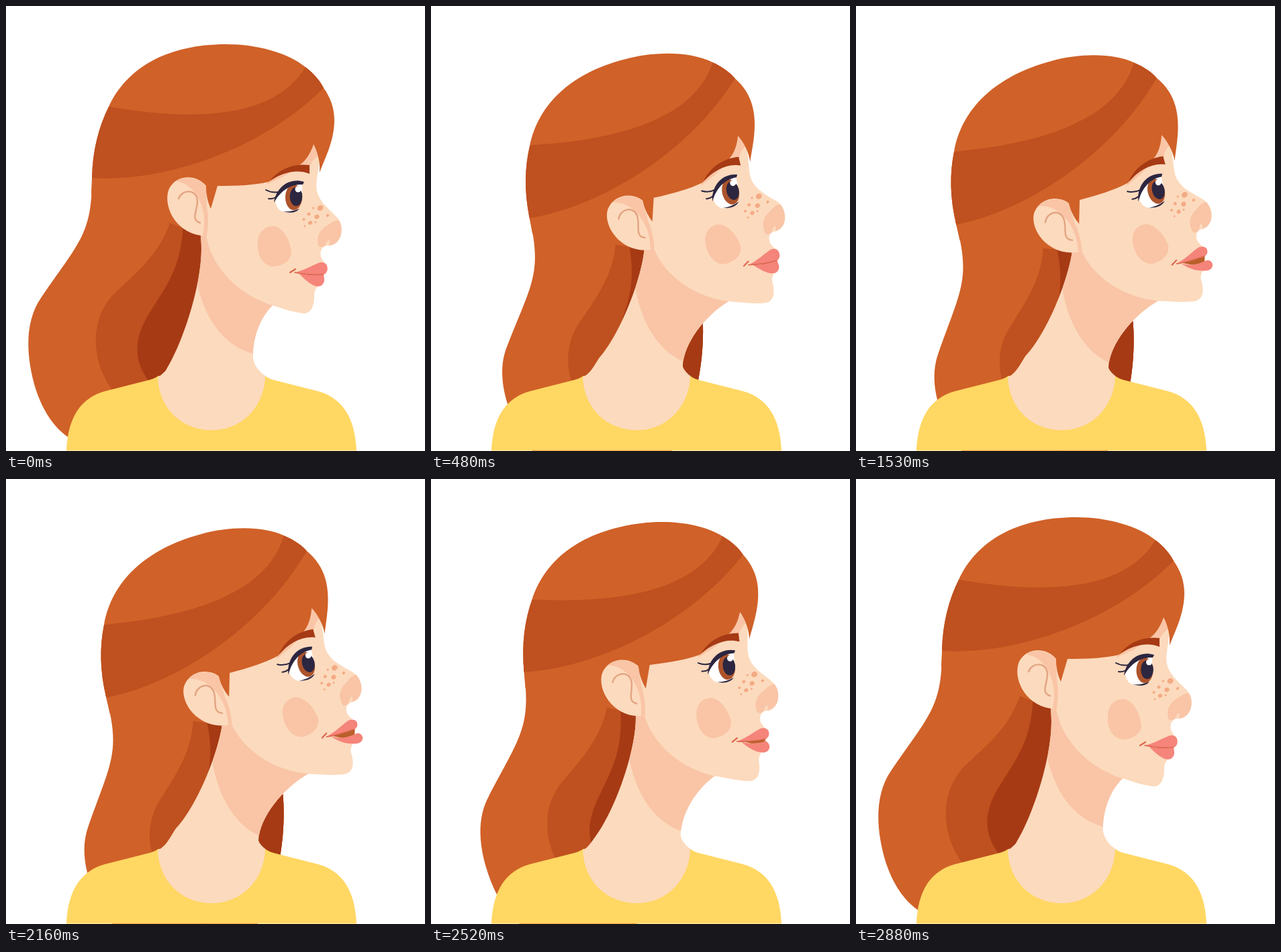
Animation of 624x663 px, one loop 3630 ms. Source, as an HTML page with a canvas:

```html
<!DOCTYPE html>
<html lang="en">
<head>
<meta charset="utf-8">
<title>Profile portrait</title>
<style>
html, body { margin: 0; width: 100%; height: 100%; overflow: hidden; background: #fff; }
canvas { display: block; }
</style>
</head>
<body>
<canvas id="stage" width="624" height="663"></canvas>
<script>
const ctx = document.getElementById('stage').getContext('2d');
const LOOP = 3630, STEP = 30;
const PIVOT = { x: 404, y: 210 }, TILT = -15 * Math.PI / 180;
const C = {
  hair: '#d06128', band: '#bf501f', deep: '#a63a14',
  skin: '#fcdabd', shade: '#f9c5a6', freckle: '#f3ab84', fold: '#e3a483',
  ink: '#2c2640', iris: '#ad532b', lip: '#f5847a', lipLine: '#dc6850',
  mouth: '#b9602a', shirt: '#ffd763'
};

const backHair = new Path2D(`M128 250 C129 340 110 350 52 435 C28 470 29 520 44 570
  C55 604 72 628 92 642 C130 664 200 668 245 652 C285 620 330 545 345 463 L330 300 Z`);
const face = new Path2D(`M460 200 L466 225 C467 245 460 262 463 275 C466 290 478 300 490 312
  C499 320 501 330 499 340 C496 353 486 358 478 357 C470 358 467 366 469 374 L476 386 L473 402
  L466 416 C458 424 459 428 459 436 C458 450 453 458 443 458 C425 456 410 450 397 446
  C344 430 299 383 297 330 L298 262 L350 240 Z`);

// A path string part way (k) between two strings of the same structure.
function mix(a, b, k) {
  const ends = b.match(/[\d.]+/g);
  let i = 0;
  return a.replace(/[\d.]+/g, n => +n + (ends[i++] - n) * k);
}

const toPath = d => d instanceof Path2D ? d : new Path2D(d);

function fill(color, d) {
  ctx.fillStyle = color;
  ctx.fill(toPath(d));
}

function stroke(color, width, d) {
  ctx.strokeStyle = color;
  ctx.lineWidth = width;
  ctx.lineCap = ctx.lineJoin = 'round';
  ctx.stroke(toPath(d));
}

function oval(color, x, y, rx, ry = rx, turn = 0) {
  ctx.fillStyle = color;
  ctx.beginPath();
  ctx.ellipse(x, y, rx, ry, turn, 0, 7);
  ctx.fill();
}

function clipped(d, draw) {
  ctx.save();
  ctx.clip(toPath(d));
  draw();
  ctx.restore();
}

// Everything on the head is rigid and turns together.
function onHead(p, draw) {
  const bow = p * (1 - p);
  ctx.save();
  ctx.translate(PIVOT.x + 12 * bow, PIVOT.y - 6 * bow);
  ctx.rotate(TILT * p);
  ctx.translate(-PIVOT.x, -PIVOT.y);
  draw();
  ctx.restore();
}

function drawBackHair() {
  fill(C.hair, backHair);
  clipped(backHair, () => {
    fill(C.band, 'M250 300 C240 350 218 377 170 420 C120 462 128 530 157 570 L185 620 L345 620 L345 300 Z');
    fill(C.deep, 'M264 320 C262 390 240 415 212 460 C188 500 192 530 212 558 L250 610 L345 610 L345 300 Z');
  });
}

function drawBody(p) {
  fill(C.shirt, `M90 662.6 C92 612 112 584 147 574 L210 558 Q220 556 227 551 L386 551
    Q392 556 402 558 L465 574 C500 584 520 612 522 662.6 Z`);
  const neck = mix(
    `M290 335 L290 345 C297 400 265 500 238 543 C234 547 230 551 226 553 C228 600 262 632 307 632
     C350 632 385 598 386 551 C374 543 369 532 368 525 C367 500 375 468 397 446 L400 400 L310 340 Z`,
    `M328 358 L322 365 C316 410 283 490 252 522 C245 533 238 548 226 553 C228 600 262 632 307 632
     C350 632 385 598 386 551 C381 547 376 541 376 538 C378 505 410 462 452 438 L430 400 L345 350 Z`, p);
  fill(C.skin, neck);
  clipped(neck, () => fill(C.shade, mix(
    'M282 325 L286 420 C300 475 330 508 368 518 L450 500 L450 325 Z',
    'M308 345 L308 425 C318 480 345 517 376 531 L470 510 L470 345 Z', p)));
}

function drawEye(blink, gaze) {
  ctx.save();
  ctx.translate(0, 300);
  ctx.scale(1, 1 - 0.92 * blink);
  ctx.translate(0, -300);
  fill('#fff', 'M401 291 C406 274 422 264 441 264 C442 285 440 298 431 305 C420 309 404 310 401 291 Z');
  oval(C.iris, 428.5 + gaze, 285, 12.5, 19);
  oval(C.ink, 432 + gaze, 284, 9.3, 14);
  oval('#fff', 435 + gaze, 273, 4.5);
  fill(C.ink, 'M399 293 C402 271 421 255 444 262 L442 266 C426 265 410 273 399 293 Z');
  stroke(C.ink, 2, 'M406 277 Q396 279 387 274 M402 285 Q397 288 391 287');
  ctx.restore();
  fill(C.ink, 'M412 306 Q426 307 437 302 Q430 311 412 306 Z');
}

function drawMouth(m) {
  fill(C.mouth, mix(
    'M438 398 L473 397 L470 403 L455 402 Z',
    'M438 398 L474 395 L470 407 L452 405 Z', m));
  fill(C.lip, mix(
    'M436 398 C446 401 458 402 473 400 C474 406 475 410 472 414 C468 420 460 418 454 414 Q446 409 436 398 Z',
    'M436 398 C446 405 460 407 473 404 C480 403 483 410 481 414 C477 422 466 418 458 415 Q446 410 436 398 Z', m));
  fill(C.lip, mix(
    'M430 397 C446 393 455 387 464 383.5 C471 380 477 383 478 387 C480 393 478 398 473 400.5 C458 402 447 400 430 397 Z',
    'M430 397 C446 393 455 387 464 383.5 C471 380 477 383 479 387 C480 393 477 396 473 397 C458 397 447 399 430 397 Z', m));
  stroke(C.lipLine, 1.6, mix('M430 397 C445 400 458 401 472 400', 'M430 397 C441 399 452 398 472 397', m));
  stroke(C.lipLine, 2.2, 'M423 397 L431 392');
}

function drawFace(blink, gaze, mouth) {
  fill(C.skin, face);
  clipped(face, () => {
    fill(C.shade, 'M455 195 L470 222 Q457 226 453 238 L436 240 L412 255 L388 266 L400 225 Z');
    fill(C.shade, `M466 359 C461 346 466 333 480 326 C488 320 492 318 503 320 L503 358 L481 358
      L482 349 C476 350 478 356 472 359 Z`);
    [[457.5, 301, 1.7], [451, 310, 2.6], [463, 314, 3.7], [443.5, 318, 2.1], [453, 323, 3.2],
     [461, 322, 1.6], [445, 328, 1.5], [468, 301, 4.6], [479, 312, 2.3]]
      .forEach(([x, y, r]) => oval(C.freckle, x, y, r, r * 0.88, -0.4));
  });
  fill(C.shade, `M375 351 C376 335 387 327 400 328 C413 331 424 350 425 368
    C423 382 410 388 396 388 C382 386 373 370 375 351 Z`);
  drawMouth(mouth);
  drawEye(blink, gaze);
}

function drawFrontHair() {
  fill(C.hair, `M128 256 C129 215 138 180 153 150 C180 92 240 57 328 57 C375 57 420 70 446 91
    C460 102 468 112 473 122 C483 136 489 152 489 170 C489 200 476 225 467 248
    C468 232 464 217 458 206 C453 221 446 231 436 238 C420 241 406 254 391 262
    C370 267 345 268 315 268 L305 302 Q299 290 297 268 L262 330 L127 280 Z`);
  fill(C.band, `M128 256 C129 215 138 180 153 150 C280 172 400 168 446 91
    C460 102 468 112 473 122 C380 215 235 263 128 256 Z`);
  fill(C.deep, 'M393 260 C407 243 428 234 452 237 L452 250 C432 242 412 249 393 260 Z');
}

function drawEar() {
  fill(C.skin, 'M298 268 C284 251 255 250 243 272 C233 295 250 336 290 342 L299 342 C302 320 297 290 298 268 Z');
  fill(C.shade, 'M253 261 C268 252 288 256 298 269 L299 300 C303 318 300 332 299 342 L293 342 C302 305 284 265 253 261 Z');
  stroke(C.fold, 2.4, 'M257 287 C262 273 283 272 285 289 C286 304 274 318 289 323');
}

const clamp = x => Math.min(1, Math.max(0, x));
const swing = u => u * u * (2.48 - 1.48 * u);
const blinkAt = (t, mid) => clamp(1 - Math.abs(t - mid) / 75);

function render(now) {
  const t = Math.floor(now % LOOP / STEP) * STEP;
  const started = clamp((t - 30) / 540);
  const returned = clamp((t - 2220) / 525);
  const p = swing(started) - swing(returned);
  const mouth = t < 2220 ? 1 - (1 - clamp((t - 600) / 1560)) ** 4 : p;
  const blink = Math.max(blinkAt(t, 675), blinkAt(t, 2805));
  const gaze = t >= 2760 ? 1.5 : 0;

  ctx.fillStyle = '#fff';
  ctx.fillRect(0, 0, 624, 663);
  onHead(p, drawBackHair);
  drawBody(p);
  onHead(p, () => {
    drawFace(blink, gaze, mouth);
    drawFrontHair();
    drawEar();
  });
}

const start = performance.now();
(function tick() {
  render(performance.now() - start);
  requestAnimationFrame(tick);
})();
</script>
</body>
</html>
```
